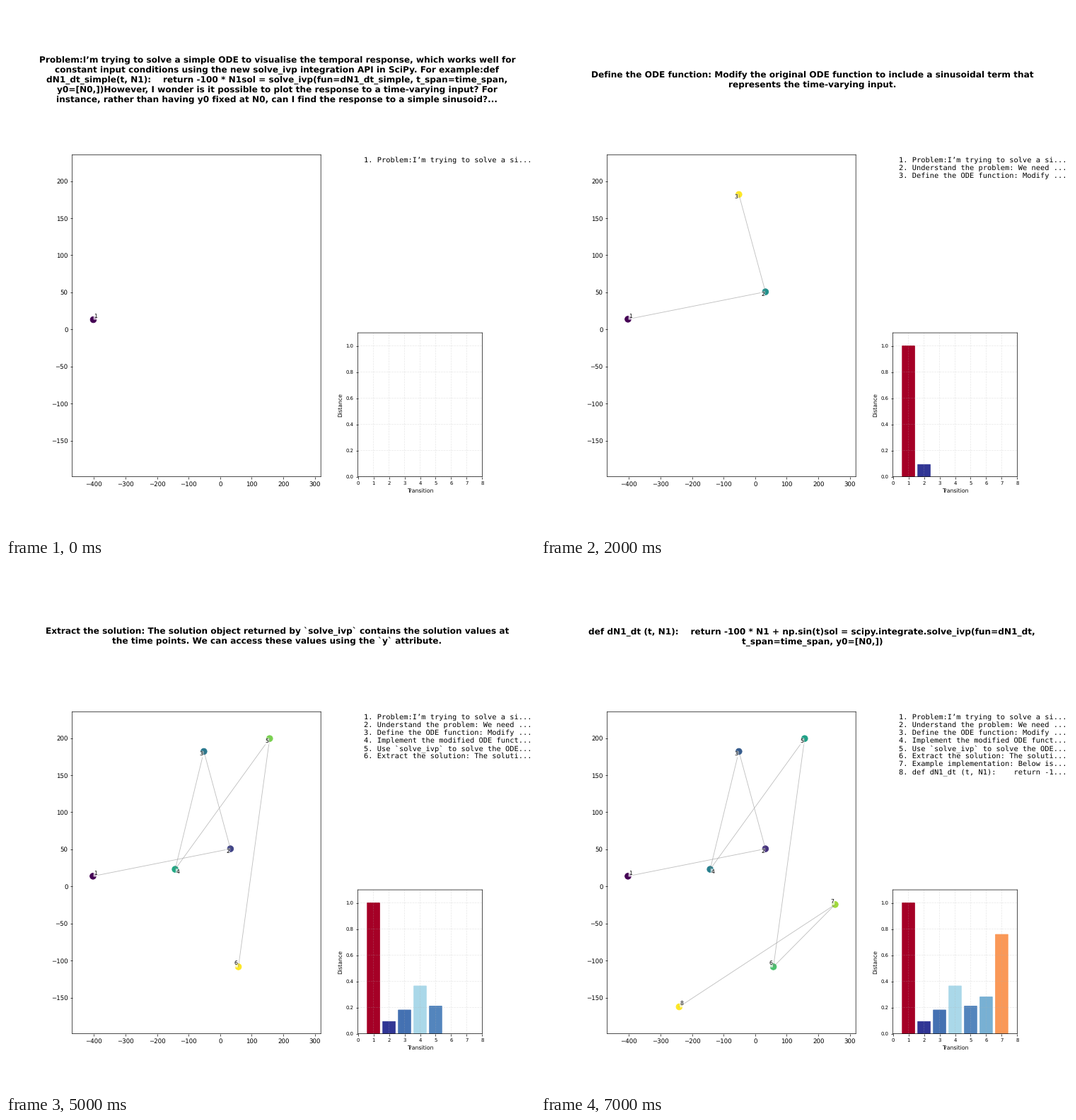
These frames come from a looping animation (748 by 748 pixels, 8 s). A matplotlib script:

```python
import matplotlib.pyplot as plt
import numpy as np
from matplotlib.animation import FuncAnimation

SIZE = 748
plt.rcParams["font.family"] = "DejaVu Sans"
plt.rcParams["text.hinting"] = "none"
plt.rcParams["path.snap"] = False

TITLES = [
    ["Problem:I’m trying to solve a simple ODE to visualise the temporal response, which works well for",
     "constant input conditions using the new solve_ivp integration API in SciPy. For example:def",
     "dN1_dt_simple(t, N1):    return -100 * N1sol = solve_ivp(fun=dN1_dt_simple, t_span=time_span,",
     "y0=[N0,])However, I wonder is it possible to plot the response to a time-varying input? For",
     "instance, rather than having y0 fixed at N0, can I find the response to a simple sinusoid?..."],
    ["Understand the problem: We need to solve an ODE with a time-varying input condition, specifically",
     "adding a sinusoidal term to the original ODE."],
    ["Define the ODE function: Modify the original ODE function to include a sinusoidal term that",
     "represents the time-varying input."],
    ["Implement the modified ODE function: The new function will take time `t` and the current state `N1`",
     "as inputs and return the derivative with the added sinusoidal term."],
    ["Use `solve_ivp` to solve the ODE: Call the `solve_ivp` function with the modified ODE function,",
     "the time span, and the initial condition."],
    ["Extract the solution: The solution object returned by `solve_ivp` contains the solution values at",
     "the time points. We can access these values using the `y` attribute."],
    ["Example implementation: Below is the code that implements these steps."],
    ["def dN1_dt (t, N1):    return -100 * N1 + np.sin(t)sol = scipy.integrate.solve_ivp(fun=dN1_dt,",
     "t_span=time_span, y0=[N0,])"],
]
POINTS = np.array([(-402.9, 13.8), (32.5, 50.7), (-51.6, 182.0), (-142.6, 23.1),
                   (156.7, 199.4), (57.7, -108.4), (253.3, -24.4), (-240.7, -162.4)])
# Side of each point on which its number sits: (right, up)
SIDES = [(1, 1), (-1, -1), (-1, -1), (1, -1), (-1, -1), (-1, 1), (-1, 1), (1, 1)]
DISTANCES = np.array([1.0, 0.093, 0.181, 0.365, 0.211, 0.281, 0.759])
COUNT = len(POINTS)

fig = plt.figure(figsize=(12, 12), dpi=SIZE / 12, facecolor="white")


def axes_px(left, top, right, bottom):
    return fig.add_axes([left / SIZE, 1 - bottom / SIZE,
                         (right - left) / SIZE, (bottom - top) / SIZE])


def text_px(x, y, text="", **style):
    return fig.text(x / SIZE, 1 - y / SIZE, text, va="baseline", **style)


def padded(values):
    pad = 0.1 * np.ptp(values)
    return values.min() - pad, values.max() + pad


# Path of the steps
path_ax = axes_px(93.7, 210.3, 445.2, 665.5)
path_ax.set(xlim=padded(POINTS[:, 0]), ylim=padded(POINTS[:, 1]),
            xticks=range(-400, 301, 100), yticks=range(-150, 201, 50))
dots = path_ax.scatter([], [], s=100, c=[], cmap="viridis", vmin=0, vmax=1)
line, = path_ax.plot([], [], color="gray", alpha=0.5, lw=1)
numbers = [
    path_ax.annotate(str(i + 1), xy, xytext=(1.7 * sx, 0), textcoords="offset points",
                     fontsize=9, ha="left" if sx > 0 else "right",
                     va="bottom" if sy > 0 else "top",
                     bbox=dict(boxstyle="round,pad=0.1", fc="white", ec="none", alpha=0.7))
    for i, (xy, (sx, sy)) in enumerate(zip(POINTS, SIDES))
]

# Distance between steps
bar_ax = axes_px(497.6, 462.1, 673.4, 665.5)
shade = (DISTANCES - DISTANCES.min()) / np.ptp(DISTANCES)
colors = plt.get_cmap("RdYlBu_r")(shade)
bars = bar_ax.bar(range(1, COUNT), DISTANCES, width=0.8, color=colors,
                  edgecolor=colors, linewidth=1)
bar_ax.set(xlim=(0, COUNT), ylim=(0, 1.1), xticks=range(COUNT + 1),
           yticks=np.arange(6) / 5)
bar_ax.set_xlabel("Transition", fontsize=9)
bar_ax.set_ylabel("Distance", fontsize=9)
bar_ax.tick_params(labelsize=8)
bar_ax.grid(True, linestyle="--", alpha=0.3)

# Heading and step list
heading = [text_px(383.35, 0, fontsize=14, weight="bold", ha="center") for _ in range(5)]
steps = [
    text_px(506.3, 221 + 11.07 * i, f"{i + 1}. {' '.join(t)[:32]}...",
            fontsize=12, family="DejaVu Sans Mono")
    for i, t in enumerate(TITLES)
]


def draw(frame):
    n = frame + 1
    dots.set_offsets(POINTS[:n])
    dots.set_array(np.arange(n) / max(1, frame))
    line.set_data(POINTS[:n].T)
    for i in range(COUNT):
        numbers[i].set_visible(i < n)
        steps[i].set_visible(i < n)
    for i, bar in enumerate(bars):
        bar.set_visible(i < frame)

    rows = TITLES[frame]
    for i, row in enumerate(heading):
        row.set_text(rows[i] if i < len(rows) else "")
        row.set_y(1 - (107 + 14 * (i - (len(rows) - 1) / 2)) / SIZE)
    return [dots, line, *numbers, *steps, *bars, *heading]


anim = FuncAnimation(fig, draw, frames=COUNT, interval=1000, repeat=True, blit=False)
plt.show()
```
